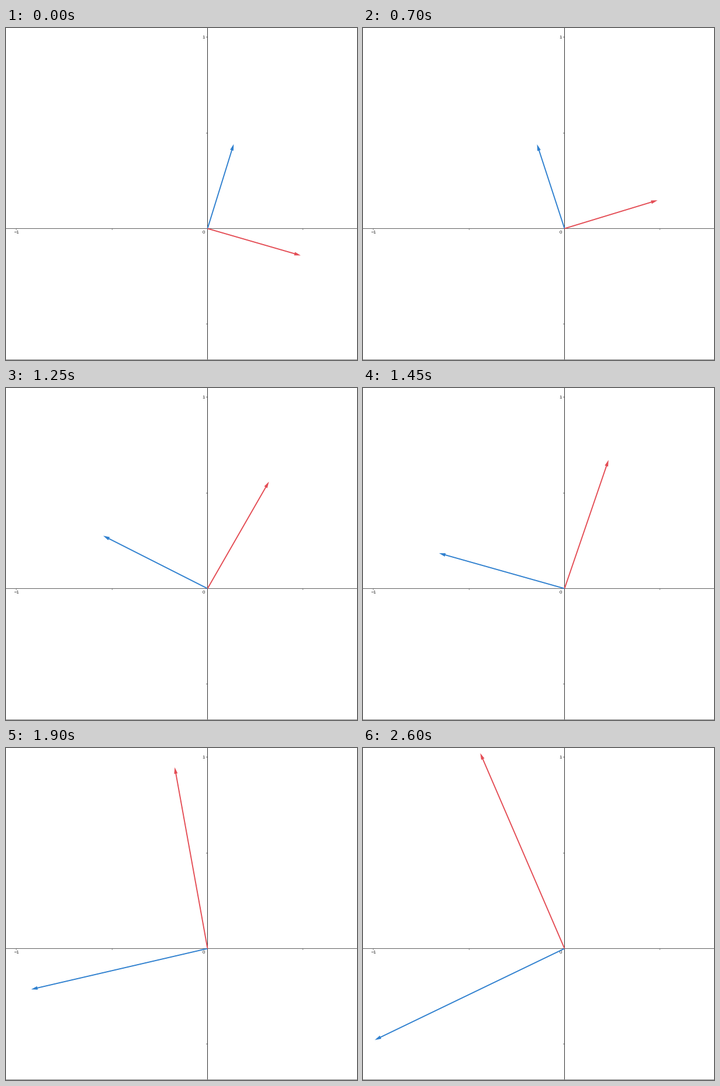
Recreate the animation shown at these times as a matplotlib script. Size 600 px wide and 567 px high, loop 2.65 s.

```python
import numpy as np
import matplotlib.pyplot as plt
from matplotlib.animation import FuncAnimation
from matplotlib.patches import Polygon, Rectangle

W, H, DPI = 600, 567, 64
PX = 72 / DPI                      # points per pixel
OX, OY, UNIT = 344.5, 342.5, 326.5
RED, BLUE = "#e44d55", "#2f80cf"
FRAMES, STEP_MS, HOLD = 53, 50, 3
HEAD_LEN, HEAD_HALF = 11, 3

# Turn of the red vector in degrees, by step; the pace is that of a hand drag.
STEPS = [0, 5, 11, 22, 30, 33, 39, 44, 49]
TURNS = [-16.1, 0.5, 16.9, 60.1, 82.1, 95.9, 109, 113.2, 113.35]

fig = plt.figure(figsize=(W / DPI, H / DPI), dpi=DPI, facecolor="white")
ax = fig.add_axes([0, 0, 1, 1])
ax.set_xlim(0, W)
ax.set_ylim(H, 0)
ax.axis("off")


def bar(x, y, w, h, color):
    ax.add_patch(Rectangle((x, y), w, h, fc=color, lw=0, antialiased=False))


def label(x, y, text):
    ax.text(x, y, text, family="Liberation Sans", size=8 * PX,
            color="#222222", ha="center", va="center")


def draw_axes():
    bar(0, 342, W, 1, "#606060")
    bar(344, 0, 1, H, "#303030")
    bar(0, 566, W, 1, "#8c8c8c")
    for x in (17, 181, 507):
        bar(x, 343, 1, 2, "#909090")
    for y in (15, 179, 505):
        bar(342, y, 2, 1, "#707070")
    label(338, 16, "1")
    label(18, 349.5, "\u22121")
    label(338, 349.5, "0")


class Arrow:
    def __init__(self, color, z):
        self.shaft, = ax.plot([], [], color=color, lw=1.9 * PX, zorder=z,
                              solid_capstyle="butt")
        self.head = Polygon(np.zeros((3, 2)), fc=color, lw=0, zorder=z)
        ax.add_patch(self.head)

    def point(self, angle, length):
        a = np.radians(angle)
        along = np.array([np.cos(a), -np.sin(a)])
        side = np.array([along[1], -along[0]])
        start = np.array([OX, OY])
        tip = start + along * length
        back = tip - along * HEAD_LEN
        self.shaft.set_data(*zip(start, back + along))
        self.head.set_xy([tip, back + side * HEAD_HALF, back - side * HEAD_HALF])


def reach(turn, a, b, c):
    """Vector length in pixels along its outward spiral."""
    u = 1 - np.cos(np.radians(turn))
    return UNIT / (a - b * u + c * u * u)


draw_axes()
blue = Arrow(BLUE, 3)
red = Arrow(RED, 4)


def update(frame):
    turn = np.interp(max(0, frame - HOLD), STEPS, TURNS)
    t = np.radians(turn)
    lead = turn + 3 * np.sin(t) + 0.55 * np.sin(2 * t)
    red.point(turn, reach(turn, 2.008, 0.979, 0.132))
    blue.point(90 + lead, reach(lead, 2.2135, 1.145, 0.163))
    return red.shaft, red.head, blue.shaft, blue.head


anim = FuncAnimation(fig, update, frames=FRAMES, interval=STEP_MS,
                     init_func=lambda: update(0), repeat=True, repeat_delay=0)
plt.show()
```
